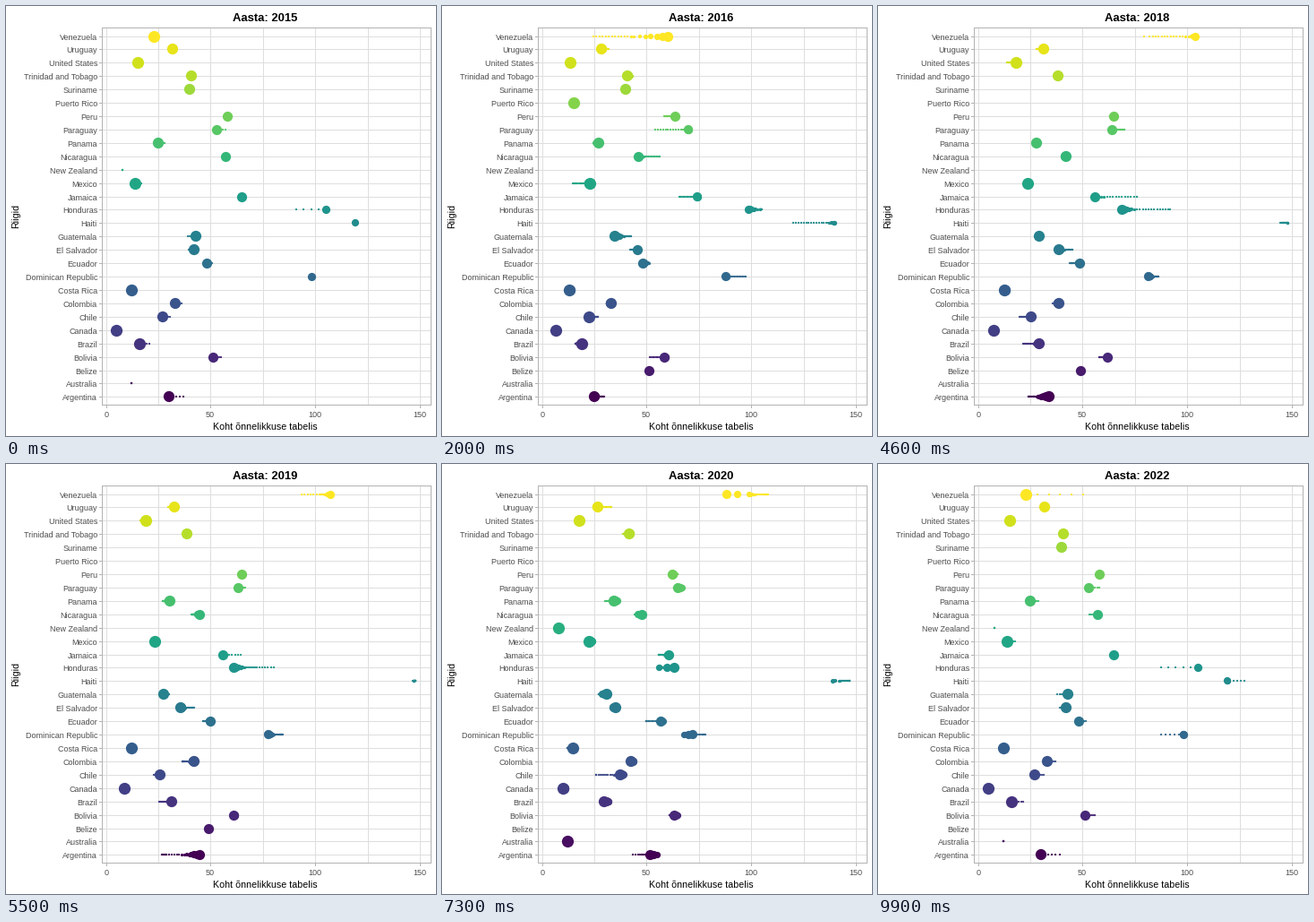
Animation, 480 px wide and 480 px high, one loop 10 s. Source, as a matplotlib script:

```python
import numpy as np
import matplotlib
import matplotlib.pyplot as plt
from matplotlib.animation import FuncAnimation

plt.rcParams["font.family"] = "Liberation Sans"

SIZE, DPI = 480, 72
FRAMES, INTERVAL = 100, 100
FIRST_YEAR, LAST_YEAR = 2015, 2022
WAKE = 20
LEFT, RIGHT, TOP, BOTTOM = 107, 474, 24, 445
X0, X_SCALE = 112.2, 2.335
Y0, Y_STEP = 436.86, 14.92
GRID, BORDER, TICK_TEXT = "#dedede", "#b3b3b3", "#4d4d4d"

# Rank per year from 2015 to 2020; the last two years repeat 2015.
RANKS = {
    "Argentina": [30, 26, 24, 29, 47, 55],
    "Australia": [None] * 5 + [12],
    "Belize": [None, 52, 50, 49],
    "Bolivia": [51, 59, 58, 62, 61, 65],
    "Brazil": [16, 17, 22, 28, 32, 32],
    "Canada": [5, 6, 7, 7, 9, 11],
    "Chile": [27, 24, 20, 25, 26, 39],
    "Colombia": [33, 31, 36, 37, 43, 44],
    "Costa Rica": [12, 14, 12, 13, 12, 15],
    "Dominican Republic": [98, 89, 86, 83, 77, 68],
    "Ecuador": [48, 51, 44, 48, 50, 58],
    "El Salvador": [42, 46, 45, 40, 35, 34],
    "Guatemala": [43, 39, 29, 30, 27, 29],
    "Haiti": [119, 136, 145, 148, 147, 142],
    "Honduras": [105, 104, 91, 72, 59, 56],
    "Jamaica": [65, 73, 76, 56, 56, 60],
    "Mexico": [14, 21, 25, 24, 23, 24],
    "New Zealand": [None] * 5 + [8],
    "Nicaragua": [57, 48, 43, 41, 45, 46],
    "Panama": [25, 25, 30, 27, 31, 36],
    "Paraguay": [53, 70, 70, 64, 63, 67],
    "Peru": [58, 64, 63, 65, 65, 63],
    "Puerto Rico": [None, 15],
    "Suriname": [40, 40],
    "Trinidad and Tobago": [41, 43, 38, 38, 39, 42],
    "United States": [15, 13, 14, 18, 19, 18],
    "Uruguay": [32, 29, 28, 31, 33, 26],
    "Venezuela": [23, 44, 82, 102, 108, 99],
}
NAMES = list(RANKS)
COUNT = len(NAMES)
KEEP_WAKE = {"Australia", "New Zealand"}
NO_WRAP = [NAMES.index(n) for n in
           ("Dominican Republic", "Haiti", "Nicaragua", "Venezuela")]

COLORS = matplotlib.colormaps["viridis"](np.linspace(0, 1, COUNT))
ROW_Y = np.floor(Y0 - Y_STEP * np.arange(COUNT))
KEYS = [round((FRAMES - 1) * k / 7) for k in range(8)]

# Happiness score as a function of rank.
SCORE_RANKS = [4, 9, 15, 23, 30, 40, 50, 64, 73, 82, 91, 99, 105, 119, 136, 142, 145, 148]
SCORES = [7.44, 7.3, 7.1, 6.77, 6.55, 6.2, 5.92, 5.68, 5.5, 5.27, 5.16, 4.98,
          4.79, 4.51, 4.03, 3.72, 3.603, 3.582]


def point_size(rank):
    score = np.interp(rank, SCORE_RANKS, SCORES)
    share = np.clip((score - 3.582) / 3.845, 0, 1)
    return 1 + 5 * np.sqrt(share)


def build_tracks():
    rank = np.full((FRAMES, COUNT), np.nan)
    size = np.zeros((FRAMES, COUNT))
    trails = np.ones((FRAMES, COUNT), bool)
    for c, name in enumerate(NAMES):
        row = RANKS[name] + [None] * (6 - len(RANKS[name]))
        row += [row[0], row[0]]
        for k in range(7):
            a, b = row[k], row[k + 1]
            if a is None:
                continue
            leaving = b is None
            end = a if leaving else b
            start, stop = KEYS[k], KEYS[k + 1]
            t = np.arange(stop - start) / (stop - start)
            span = slice(start, stop)
            rank[span, c] = a + (end - a) * t
            size[span, c] = point_size(a) + (point_size(end) - point_size(a)) * t
            trails[span, c] = not leaving or name in KEEP_WAKE
        if row[-1] is not None:
            rank[-1, c] = row[-1]
            size[-1, c] = point_size(row[-1])
    return rank, size, trails


RANK, POINT, TRAILS = build_tracks()


def dots(i):
    """Centres, diameters and colours of the points and their wake."""
    xs, ys, ds, cs = [], [], [], []
    for age in range(WAKE - 1, -1, -1):
        j = (i - age) % FRAMES
        show = ~np.isnan(RANK[j])
        if age:
            show &= TRAILS[j]
            if j > i:
                show[NO_WRAP] = False
        size = POINT[j, show] * (1 - age / WAKE) ** 4
        d = np.maximum(2, np.floor(0.75 * (size * 2.845 + 0.945) + 0.5))
        shift = d / 2 - d // 2
        xs.append(np.floor(X0 + X_SCALE * RANK[j, show]) + shift)
        ys.append(ROW_Y[show] + shift)
        ds.append(d + 0.25)
        cs.append(COLORS[show])
    return (np.column_stack([np.concatenate(xs), np.concatenate(ys)]),
            np.concatenate(ds), np.concatenate(cs))


fig = plt.figure(figsize=(SIZE / DPI, SIZE / DPI), dpi=DPI, facecolor="white")
ax = fig.add_axes([0, 0, 1, 1])
ax.set_xlim(0, SIZE)
ax.set_ylim(SIZE, 0)
ax.axis("off")


def line(x1, y1, x2, y2, color, z=1):
    ax.plot([x1 + 0.5, x2 + 0.5], [y1 + 0.5, y2 + 0.5], color=color, lw=1,
            snap=False, solid_capstyle="projecting", zorder=z)


def label(x, y, text, size, color="black", ha="center", **kw):
    return ax.text(x, y, text, fontsize=size, color=color, ha=ha, va="baseline", **kw)


for value in range(0, 151, 25):
    x = int(X0 + X_SCALE * value)
    line(x, TOP, x, BOTTOM, GRID)
    if value % 50 == 0:
        line(x, BOTTOM + 1, x, BOTTOM + 3, BORDER)
        label(x, 459, str(value), 9, TICK_TEXT)

for name, y in zip(NAMES, ROW_Y):
    line(LEFT, y, RIGHT, y, GRID)
    line(LEFT - 3, y, LEFT - 1, y, BORDER)
    label(102, y + 4, name, 9, TICK_TEXT, ha="right")

for x in (LEFT, RIGHT):
    line(x, TOP, x, BOTTOM, BORDER, 4)
for y in (TOP, BOTTOM):
    line(LEFT, y, RIGHT, y, BORDER, 4)

label(289.5, 473, "Koht õnnelikkuse tabelis", 10.6)
ax.text(16, 234.5, "Riigid", fontsize=10.6, rotation=90, ha="right", va="center")
title = label(289.5, 17, "", 13, weight="bold")
points = ax.scatter([], [], linewidths=0, zorder=3)


def draw(i):
    xy, d, colors = dots(i)
    points.set_offsets(xy)
    points.set_sizes(d ** 2)
    points.set_facecolors(colors)
    year = round(FIRST_YEAR + (LAST_YEAR - FIRST_YEAR) * i / (FRAMES - 1))
    title.set_text(f"Aasta: {year}")
    return points, title


anim = FuncAnimation(fig, draw, frames=FRAMES, interval=INTERVAL,
                     init_func=lambda: draw(0), repeat=True, repeat_delay=0)
plt.show()
```
